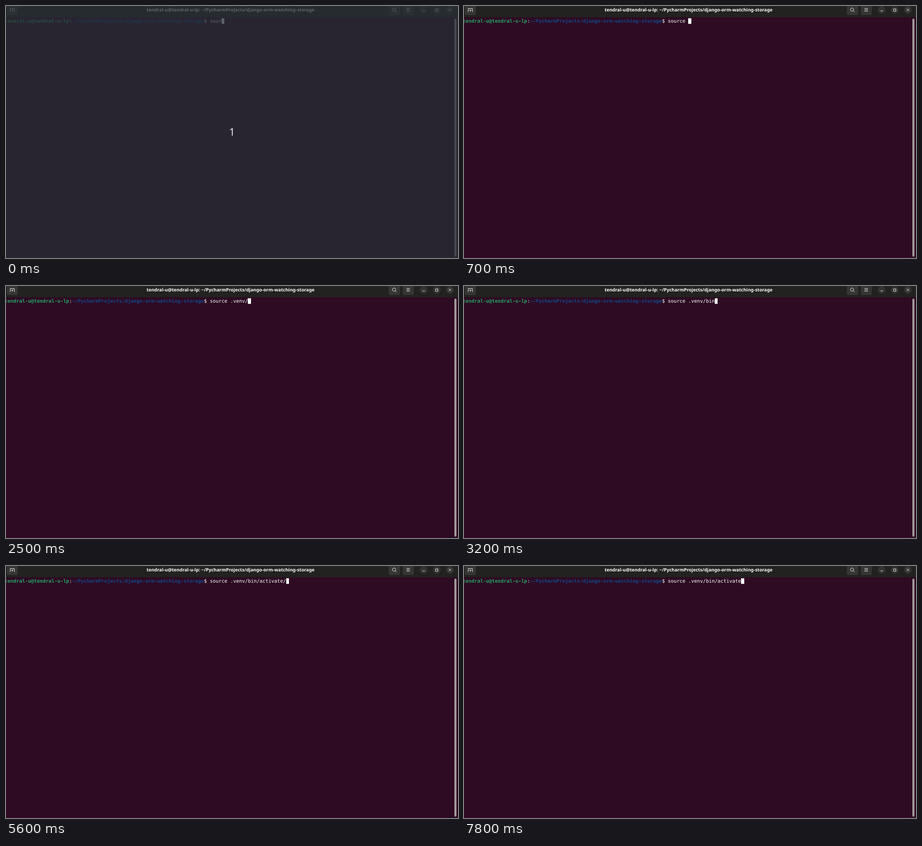
These frames come from a looping animation (1000x560 px, 8000 ms). An HTML page:

```html
<!DOCTYPE html>
<html lang="en">
<head>
<meta charset="utf-8">
<title>Terminal</title>
<style>
  html, body { margin: 0; width: 100%; height: 100%; overflow: hidden; background: #2e0b23; }
  svg { display: block; width: 1000px; height: 560px; }
  text { white-space: pre; text-rendering: geometricPrecision; fill: #fff; }
  .mono { font: 10.772px "DejaVu Sans Mono", monospace; }
  .bold { font-weight: bold; }
  .title { font: bold 10.12px "Noto Sans", sans-serif; text-anchor: middle; }
  .count { font: 23px "Noto Sans", sans-serif; text-anchor: middle; fill: #e6e8e9; }
  .button { fill: #363635; }
  .icon { fill: none; stroke: #f2f2f2; stroke-width: 1; }
</style>
</head>
<body>
<svg viewBox="0 0 1000 560">
  <rect width="1000" height="560" fill="#2e0b23"/>
  <rect width="1000" height="25" fill="#222220"/>

  <g class="button">
    <path d="M2 0H26V17a3 3 0 0 1-3 3H5a3 3 0 0 1-3-3Z"/>
    <path d="M847 0H872V17a3 3 0 0 1-3 3H850a3 3 0 0 1-3-3Z"/>
    <path d="M878 0H902V17a3 3 0 0 1-3 3H881a3 3 0 0 1-3-3Z"/>
    <circle cx="924" cy="8.7" r="8.3"/>
    <circle cx="953" cy="8.7" r="8.3"/>
    <circle cx="982" cy="8.7" r="8.3"/>
  </g>
  <g class="icon">
    <path d="M8.5 12.5H9.5V5.5H18.5V12.5H19.5M14 7.5V12M11.8 9.7H16.2"/>
    <circle cx="858.5" cy="8" r="3.6"/>
    <path d="M861.1 10.6L864 13.5"/>
    <path d="M886 5.5H893.6M886 8.5H893.6M886 11.5H893.6"/>
    <path d="M921.5 11H927"/>
    <rect x="950.5" y="6.5" width="5" height="5"/>
    <path d="M979.3 6L984.7 11.4M984.7 6L979.3 11.4"/>
  </g>
  <text class="title" id="title" x="496.8" y="12.2"></text>

  <g class="mono" id="line"></g>
  <rect id="cursor" y="27.3" height="12.4" fill="#fff"/>
  <rect x="992" y="28" width="4.6" height="529" rx="2.3" fill="#a19b9d"/>

  <g id="countdown">
    <rect width="1000" height="560" fill="#262e34" fill-opacity=".75"/>
    <text class="count" x="500" y="288.3">1</text>
  </g>
</svg>
<script>
const LOOP = 8000;
const CELL = 6.485, LEFT = -3;
const HOST = "tendral-u@tendral-u-lp";
const FOLDER = "~/PycharmProjects/django-orm-watching-storage";
const COMMAND = "source .venv/bin/activate/";
const PRETYPED = 4;
const COUNTDOWN_END = 100;
const BACKSPACE = 7800;
const keyTimes = [100, 300, 700, 1300, 1500, 1700, 1800, 2000, 2500, 2900, 3000, 3200,
  3700, 3800, 3900, 4200, 4400, 4500, 4700, 5000, 5200, 5600];
const cursorOff = [[1200, 1300], [6100, 6700], [7300, 7700]];

const byId = id => document.getElementById(id);
const columnX = column => LEFT + column * CELL;

let column = 0;
function addRun(content, color, bold) {
  const run = document.createElementNS("http://www.w3.org/2000/svg", "text");
  run.setAttribute("x", columnX(column));
  run.setAttribute("y", 37.2);
  run.style.fill = color;
  if (bold) run.classList.add("bold");
  run.textContent = content;
  byId("line").append(run);
  column += content.length;
  return run;
}

addRun(HOST, "#26a269", true);
addRun(":", "#fff");
addRun(FOLDER, "#12488b", true);
addRun("$ ", "#fff");
const commandColumn = column;
const command = addRun("", "#fff");
const cursor = byId("cursor");
byId("title").textContent = `${HOST}: ${FOLDER}`;

function render(t) {
  const typed = PRETYPED + keyTimes.filter(k => k <= t).length - (t >= BACKSPACE ? 1 : 0);
  const start = Math.round(columnX(commandColumn + typed));
  const end = Math.round(columnX(commandColumn + typed + 1));
  const hidden = cursorOff.some(([from, to]) => t >= from && t < to);

  command.textContent = COMMAND.slice(0, typed);
  cursor.setAttribute("x", start);
  cursor.setAttribute("width", end - start);
  cursor.style.display = hidden ? "none" : "";
  byId("countdown").style.display = t < COUNTDOWN_END ? "" : "none";
}

let origin;
function tick(now) {
  origin ??= now;
  render((now - origin) % LOOP);
  requestAnimationFrame(tick);
}
render(0);
requestAnimationFrame(tick);
</script>
</body>
</html>
```
